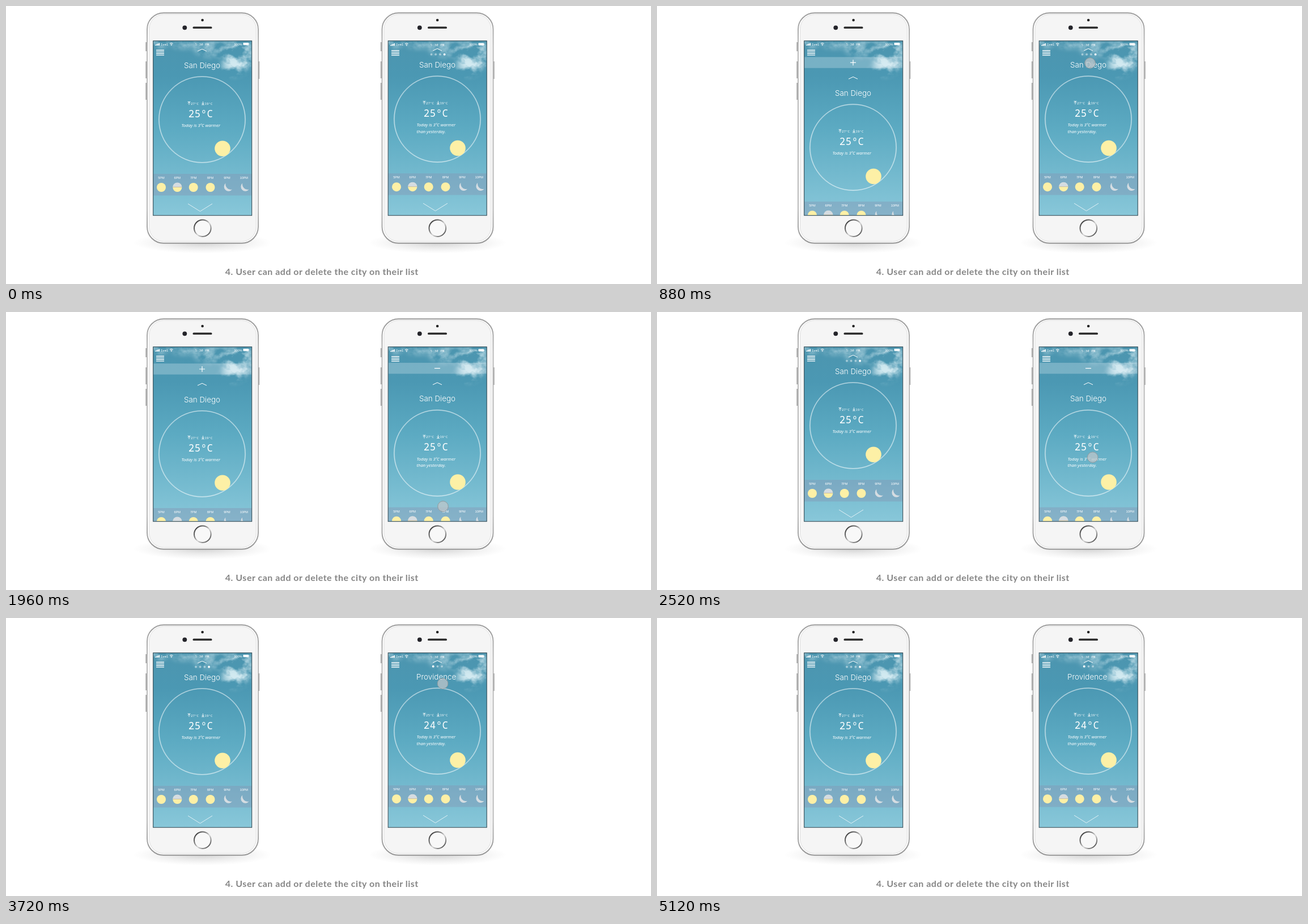
Animation, 1138 px wide and 492 px high, one loop 5.16 s. Source, as an HTML page:

```html
<!DOCTYPE html>
<html lang="en">
<head>
<meta charset="utf-8">
<title>City list</title>
<style>
  html, body { margin: 0; width: 100%; height: 100%; overflow: hidden; background: #fff; }
  svg { display: block; width: 1138px; height: 492px; }
  text { fill: #fff; }
  .line { fill: none; stroke: #fff; }
  .mid { text-anchor: middle; }
  .mono { font-family: "Noto Sans Mono", monospace; }
  .city { font: 300 13.4px Inter, sans-serif; }
  .temp { font-size: 17.4px; font-weight: 300; letter-spacing: .5px; }
  .small { font-size: 5.8px; }
  .hour { font: 5.6px "Liberation Sans", sans-serif; }
  .note { font: italic 300 7.6px "Noto Sans", sans-serif; }
  .caption { font: 700 16px Lato, sans-serif; letter-spacing: .5px; fill: #868686; }
</style>
</head>
<body>
<svg id="stage" viewBox="0 0 1138 492"></svg>
<script>
const LOOP = 5160, STEP = 40;
const PAGE_GAP = 178;

const defs = `<defs>
  <linearGradient id="sky" x2="0" y2="1">
    <stop offset="0" stop-color="#4c95af"/><stop offset=".2" stop-color="#4b98b3"/>
    <stop offset=".5" stop-color="#5caac2"/><stop offset="1" stop-color="#88c7d9"/>
  </linearGradient>
  <linearGradient id="edge" x2="0" y2="1">
    <stop offset="0" stop-color="#9c9c9c"/><stop offset=".15" stop-color="#b8b8b8"/>
    <stop offset=".85" stop-color="#b8b8b8"/><stop offset="1" stop-color="#969696"/>
  </linearGradient>
  <linearGradient id="ring" x2="1" y2="1">
    <stop offset="0" stop-color="#222"/><stop offset=".35" stop-color="#777"/>
    <stop offset=".55" stop-color="#d8d8d8"/><stop offset=".75" stop-color="#888"/>
    <stop offset="1" stop-color="#2a2a2a"/>
  </linearGradient>
  <radialGradient id="shade">
    <stop offset="0" stop-color="#777" stop-opacity=".35"/>
    <stop offset=".6" stop-color="#999" stop-opacity=".14"/>
    <stop offset="1" stop-color="#aaa" stop-opacity="0"/>
  </radialGradient>
  <filter id="puff" filterUnits="userSpaceOnUse" x="250" y="52" width="194" height="110" color-interpolation-filters="sRGB">
    <feTurbulence type="fractalNoise" baseFrequency=".035 .045" numOctaves="5" seed="8"/>
    <feColorMatrix values="0 0 0 0 .88  0 0 0 0 .95  0 0 0 0 .97  3.4 0 0 0 -1.3" result="wisps"/>
    <feGaussianBlur in="SourceGraphic" stdDeviation="5" result="area"/>
    <feComposite in="wisps" in2="area" operator="in"/>
  </filter>
  <clipPath id="screen"><rect x="260" y="62" width="173.5" height="308.5"/></clipPath>
  <g id="backdrop" clip-path="url(#screen)">
    <rect x="260" y="62" width="173.5" height="308.5" fill="url(#sky)"/>
    <g filter="url(#puff)">
      <ellipse cx="268" cy="62" rx="18" ry="11" opacity=".7"/>
      <ellipse cx="315" cy="66" rx="24" ry="9" opacity=".5"/>
      <ellipse cx="366" cy="76" rx="34" ry="14" opacity=".5"/>
      <ellipse cx="411" cy="88" rx="30" ry="27" opacity=".85"/>
      <ellipse cx="400" cy="112" rx="24" ry="13" opacity=".5"/>
    </g>
  </g>
</defs>`;

const range = n => [...Array(n).keys()];

const statusBar = () => `
  ${range(4).map(i => `<rect x="${263 + i * 2.2}" y="${68.5 - i}" width="1.6" height="${1.5 + i}" fill="#fff"/>`).join('')}
  <text class="mono" x="273" y="69.5" font-size="5.6">Ivel</text>
  <path class="line" d="M289 66.4q2.8-2.4 5.6 0M290.2 68q1.6-1.4 3.2 0"/>
  <circle cx="291.8" cy="69.4" r=".8" fill="#fff"/>
  <text class="mono mid" x="346" y="70" font-size="5.4" letter-spacing=".25">5:30 PM</text>
  <text class="hour" x="402.5" y="69.5">100%</text>
  <rect x="418.5" y="65" width="9.5" height="4.2" rx=".8" fill="#fff"/>
  <rect x="428.4" y="66.2" width="1" height="1.8" fill="#fff"/>
  <path class="line" stroke-width="1.4" d="M265 78.2h14M265 81.1h14M265 84h14M265 86.9h14"/>`;

const moon = x => `<path fill="#d6dde2" d="M${x - 3.5} 313.6a8 8 0 1 0 11.5 11a9.4 9.4 0 0 1-11.5-11z"/>`;
const sun = x => `<circle cx="${x}" cy="321" r="8" fill="#fdf0a6"/>`;
const halfSun = x => sun(x) +
  `<path d="M${x - 8} 320.5a8 8 0 0 1 16 0z" fill="#d5dce1"/><path d="M${x - 8} 320.5h16" stroke="#b9ac9c" stroke-width=".7"/>`;

const hours = () => {
  const icons = [sun, halfSun, sun, sun, moon, moon];
  return [274, 302.3, 330.7, 360.5, 390, 419.7].map((x, i) =>
    `<text class="hour mid" x="${x}" y="306">${i + 5}PM</text>${icons[i](x + (i > 3 ? 1 : 0))}`).join('');
};

const dots = (count, active, x) => range(count).map(i =>
  `<circle cx="${x + i * 7.7}" cy="86.5" r="1.9" fill="#fff" opacity="${i === active ? 1 : .45}"/>`).join('');

function page({ id, city, cityX, high, temp, sign, note, pager, nudge }) {
  return `<g id="${id}">
    <use href="#backdrop"/>
    <g transform="translate(${nudge} ${nudge})">${statusBar()}</g>
    <g transform="translate(${nudge} ${-nudge * 1.6})"><g class="scroll">
      <rect x="258" y="41.2" width="178" height="19.4" fill="#dceaf0" opacity=".3"/>
      <path class="line" stroke-width="1.2" d="M341 51h10${sign === '+' ? 'M346 46v10' : ''}"/>
      <path class="line" d="M338 80l8-3.8l8 3.8"/>
      <g class="dots">${pager}</g>
      <text class="city mid" x="${cityX}" y="109.7">${city}</text>
      <circle class="line" cx="346" cy="201" r="76" stroke-width="2.2" opacity=".25"/>
      <circle class="line" cx="346" cy="201" r="76.2" stroke-width="1" opacity=".55"/>
      <path class="line" stroke-width=".8" d="M320.5 169.4h5M323 175v-5l-2.2 2.4M323 170l2.2 2.4M345 174.8h5M347.5 169v5l-2.2-2.4M347.5 174l2.2-2.4"/>
      <text class="mono small" x="326" y="174.8">${high}°C</text>
      <text class="mono small" x="350.5" y="174.8">19°C</text>
      <text class="mono temp mid" x="343.7" y="196.5">${temp}ºC</text>
      ${note.map((s, i) => `<text class="note" x="309.5" y="${214 + i * 11.5}">${s}</text>`).join('')}
      <circle cx="382" cy="252.3" r="13.8" fill="#fdf0a6"/>
      <rect x="258" y="297" width="178" height="38.3" fill="#8398b3" opacity=".45"/>
      ${hours()}
      <path class="line" opacity=".75" d="M321 350l21.5 13.4L364 350"/>
    </g></g>
  </g>`;
}

const phone = (x, pages) => `<g transform="translate(${x})">
  <ellipse cx="347" cy="419" rx="122" ry="19" fill="url(#shade)"/>
  <path stroke="#a3a3a3" stroke-width="2.4" d="M247.6 64v16M247.6 98v30M247.6 136v30M446 98v31"/>
  <rect x="249" y="12.2" width="196" height="407.6" rx="29" fill="#fff" stroke="url(#edge)" stroke-width="2"/>
  <rect x="252.5" y="14.8" width="189" height="402" rx="26" fill="#f5f5f5" stroke="#dedede"/>
  <circle cx="346.6" cy="25" r="2.3" fill="#222"/>
  <circle cx="315.3" cy="38.3" r="3.9" fill="#24242a"/>
  <rect x="329.5" y="36.6" width="34" height="3.5" rx="1.7" fill="#2c2c2c"/>
  <circle cx="346.8" cy="393.2" r="14.8" fill="#f8f8f8" stroke="url(#ring)" stroke-width="2"/>
  <rect x="260" y="62" width="173.5" height="308.5" fill="#fff"/>
  <g clip-path="url(#screen)">${pages}</g>
  <rect x="259.7" y="61.7" width="174" height="309" fill="none" stroke="#203c49" stroke-width="1"/>
</g>`;

const today = 'Today is 3ºC warmer';
const sanDiego = { city: 'San Diego', cityX: 346, high: 27, temp: 25 };
const twoLines = [today, 'than yesterday.'];

document.getElementById('stage').innerHTML = defs +
  phone(0, page({ ...sanDiego, id: 'added', sign: '+', note: [today], pager: dots(4, 3, 335), nudge: 0 })) +
  phone(414.5,
    page({ ...sanDiego, id: 'removed', sign: '-', note: twoLines, pager: dots(4, 3, 335.5), nudge: .5 }) +
    page({ id: 'next', city: 'Providence', cityX: 344.2, high: 25, temp: 24, sign: '-',
           note: twoLines, pager: dots(3, 0, 338.7), nudge: .5 })) +
  `<text class="caption mid" x="557.3" y="476">4. User can add or delete the city on their list</text>
  <g id="touch"><circle r="9.3" fill="#bdc6c9" fill-opacity=".75" stroke="#8f9a9e" stroke-width="1"/></g>
  <path id="cursor" d="M0 0v5.2l1.2-1l.9 2l1-.5l-.9-1.9h1.6z" fill="#111" stroke="#dfe9ec" stroke-width=".3"/>`;

// Each track row is [time, value]; values are eased between rows.
const tracks = {
  addScroll: [[200, 0], [760, 49], [1200, 50], [1980, 50], [2240, 0]],
  removeScroll: [[1225, 0], [1600, 25], [1960, 49.5]],
  slide: [[3176, 0], [3440, PAGE_GAP]],
  touchX: [[880, 764], [1200, 771], [2300, 771], [2900, 763.5], [3240, 763.5], [3720, 770.5]],
  touchY: [[880, 101], [1200, 292], [1600, 317], [1960, 344], [2300, 344], [2900, 107], [3240, 107], [3720, 116]],
  touchAlpha: [[800, 0], [880, 1], [3760, 1], [3920, 0]]
};
const linear = k => k;
const smooth = k => k * k * (3 - 2 * k);

function at(track, t, ease = linear) {
  const i = track.findIndex(([time]) => time > t);
  if (i === 0) return track[0][1];
  if (i < 0) return track[track.length - 1][1];
  const [t0, a] = track[i - 1], [t1, b] = track[i];
  return a + (b - a) * ease((t - t0) / (t1 - t0));
}

const $ = s => document.querySelector(s);
const move = (el, x, y) => el.setAttribute('transform', `translate(${x} ${y})`);
const show = (el, on) => el.setAttribute('visibility', on ? 'visible' : 'hidden');
const within = (t, a, b) => t >= a && t < b;

const added = $('#added .scroll'), addedDots = $('#added .dots');
const removed = $('#removed'), removedScroll = $('#removed .scroll'), removedDots = $('#removed .dots');
const next = $('#next'), touch = $('#touch'), cursor = $('#cursor');

function draw(t) {
  const scroll = at(tracks.removeScroll, t);
  const slide = at(tracks.slide, t, smooth);
  move(added, 0, at(tracks.addScroll, t, smooth));
  show(addedDots, t >= 2240);
  move(removedScroll, 0, scroll);
  show(removedDots, scroll === 0);
  move(removed, -slide, 0);
  move(next, PAGE_GAP - slide, 0);
  move(touch, at(tracks.touchX, t, smooth), at(tracks.touchY, t));
  touch.setAttribute('opacity', at(tracks.touchAlpha, t));
  const late = t > 2600;
  move(cursor, late ? 362 : 350.5, late ? 120.5 : 126.5);
  show(cursor, within(t, 1480, 1760) || within(t, 3000, 3400));
}

const start = performance.now();
function tick() {
  const t = (performance.now() - start) % LOOP;
  draw(Math.floor(t / STEP) * STEP);
  requestAnimationFrame(tick);
}
tick();
</script>
</body>
</html>
```
